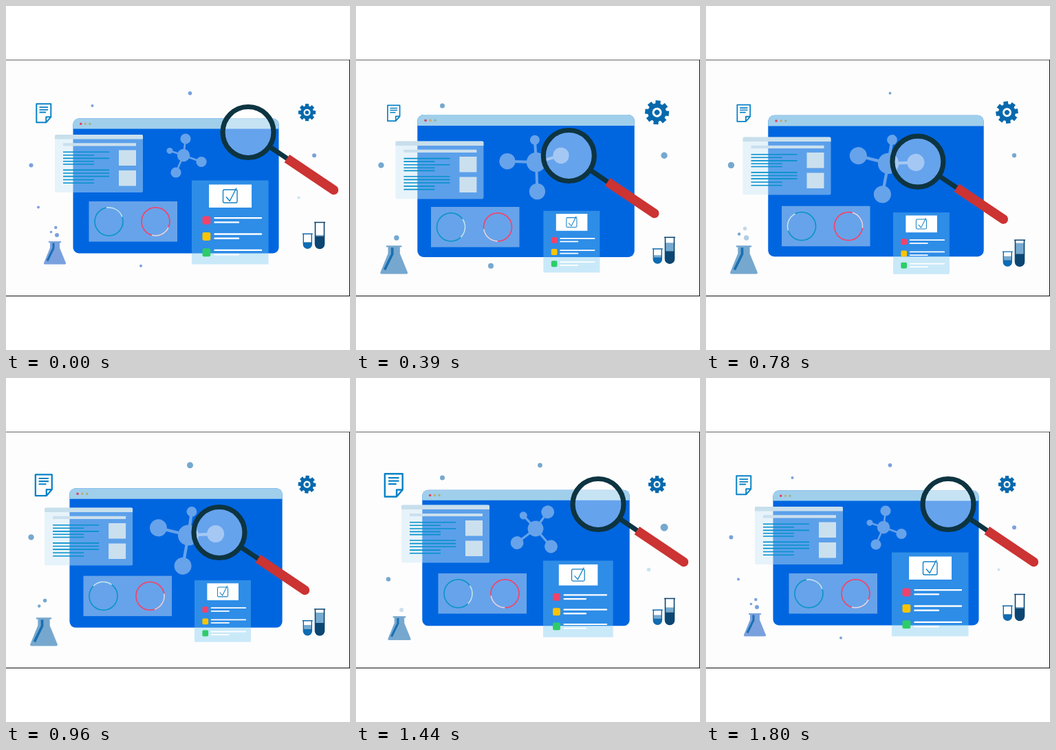
An HTML page that plays this animation: 500x500 px, repeating every 1830 ms.

```html
<!DOCTYPE html>
<html lang="en">
<head>
<meta charset="utf-8">
<title>Research dashboard</title>
<style>
html, body { margin: 0; width: 100%; height: 100%; overflow: hidden; background: #fff; }
svg { display: block; width: 100vw; height: 100vh; }
.line { fill: none; stroke-linejoin: round; }
</style>
</head>
<body>
<svg id="stage" viewBox="0 0 500 500" xmlns="http://www.w3.org/2000/svg">
  <rect y="78" width="500" height="343" fill="#fdfdfd"/>
  <path d="M0 78.5H500" stroke="#666"/>
  <path d="M0 421.5H500M499.5 78V422" stroke="#111"/>

  <g id="dots"></g>

  <g id="doc" class="line" stroke="#0a82c6" stroke-width="2">
    <path d="M3.5 13.5H-10.5V-13.5H10.5V5.5ZV5.5H10.5"/>
    <path d="M-6.3 -8.6H6.3M-6.3 -5H6.3M-6.3 -1.3H3.2" stroke-width="1.8"/>
  </g>

  <g id="gear" fill="#0669ad">
    <g id="teeth"></g>
    <circle r="9.6"/>
    <circle r="5" fill="#fdfdfd"/>
    <circle r="2.7"/>
  </g>

  <g id="flask">
    <path d="M-9 -33.5H9V-31.5H7V-24L16 -2Q16.500 0 14.500 0H-14.500Q-16.500 0 -16 -2L-7 -24V-31.500H-9Z"/>
    <path class="line" d="M-2 -31V-23.500L-11 -5" stroke="#1a70b2" stroke-width="3"/>
    <circle class="bubble" cx="3" cy="-42.500" r="3"/>
    <circle class="bubble" cx="-5.500" cy="-47" r="1.800"/>
    <circle class="bubble" cx="1.300" cy="-53.500" r="2.200"/>
  </g>

  <g id="tubes">
    <g transform="translate(448 313.500)">
      <rect id="tallLevel" x="1.500" width="13" fill="#76aad0"/>
      <path d="M1.500 21H14.500V32.500a6.500 6.500 0 0 1 -13 0Z" fill="#0c4673"/>
      <path class="line" d="M0 1H16M1.500 1V32.500a6.500 6.500 0 0 0 13 0V1" stroke="#0c4673" stroke-width="1.600"/>
    </g>
    <g transform="translate(430.800 330.500)">
      <rect id="shortLevel" x="1.500" width="12" fill="#76aad0"/>
      <path d="M1.500 13H13.500V15.800a6 6 0 0 1 -12 0Z" fill="#0f6cb2"/>
      <path class="line" d="M0 .8H15M1.500 .8V15.800a6 6 0 0 0 12 0V.8" stroke="#1068ab" stroke-width="1.400"/>
    </g>
  </g>

  <g id="win">
    <rect x="-149.500" y="-98" width="299" height="196" rx="8.500" fill="#0066e0"/>
    <path d="M-149.500 -83V-89.500a8.500 8.500 0 0 1 8.500 -8.500H141a8.500 8.500 0 0 1 8.500 8.500V-83Z" fill="#a0cfec"/>
    <circle cx="-138.300" cy="-90.200" r="1.700" fill="#e0405e"/>
    <circle cx="-131.600" cy="-90.200" r="1.700" fill="#c5ab70"/>
    <circle cx="-125" cy="-90.200" r="1.700" fill="#9bb58a"/>
  </g>

  <g id="chart">
    <rect width="128.500" height="58.500" fill="#67a3ea"/>
    <g class="line" stroke-width="1.700">
      <circle cx="29" cy="29.300" r="20.500" stroke="#0c95cb"/>
      <circle cx="97" cy="29.300" r="20.500" stroke="#f2446a"/>
      <circle class="arc" cx="29" cy="29.300" r="20.500"/>
      <circle class="arc" cx="97" cy="29.300" r="20.500"/>
    </g>
  </g>

  <g id="molecule" fill="#67a3ea" stroke="#67a3ea"></g>

  <g id="article">
    <rect width="128" height="84" rx="2" fill="#cde6f5" fill-opacity=".45"/>
    <path d="M0 6.500V2a2 2 0 0 1 2 -2H126a2 2 0 0 1 2 2V6.500Z" fill="#c8dfec"/>
    <path d="M12 12.300H118V16.500H12ZM93 22.500H118V45H93ZM93 52H118V74.500H93Z" fill="#cbe0ee"/>
    <path id="text" stroke="#0591cb" stroke-width="1.600"/>
  </g>

  <g id="list">
    <rect width="111.500" height="122" fill="#76c8f3" fill-opacity=".39"/>
    <rect x="25" y="6" width="62" height="33.500" fill="#fff"/>
    <g class="line" stroke="#1581c4" stroke-width="1.400">
      <rect x="45.500" y="13.500" width="20.500" height="19" rx="2"/>
      <path d="M50 24L55.200 30L65 11"/>
    </g>
    <g id="items"></g>
  </g>

  <g id="lens">
    <circle r="37" fill="#fff" fill-opacity=".4"/>
    <circle class="line" r="37" stroke="#0d3441" stroke-width="7.200"/>
    <g transform="rotate(34)">
      <path d="M38 0H70" stroke="#0d3441" stroke-width="7"/>
      <path d="M68 -6.800H150a6.800 6.800 0 0 1 0 13.600H68Z" fill="#cc3333"/>
    </g>
  </g>
</svg>

<script>
const LOOP = 1830, STEP = 30;
const TIMES = [0, 390, 630, 960, 1230, 1440, 1800];
const $ = id => document.getElementById(id);
const all = cls => [...document.querySelectorAll('.' + cls)];

// Looping monotone cubic through the values at TIMES, at rest where the loop joins.
function track(...values) {
  const v = [...values, values[0]];
  const rate = i => (v[i + 1] - v[i]) / (TIMES[i + 1] - TIMES[i]);
  const slope = v.map((_, i) => {
    if (i === 0 || i === v.length - 1) return 0;
    const a = rate(i - 1), b = rate(i);
    return a * b > 0 ? 2 * a * b / (a + b) : 0;
  });
  return t => {
    if (t >= 1800) return v[0];
    const i = TIMES.findIndex(end => t < end) - 1;
    const h = TIMES[i + 1] - TIMES[i], u = (t - TIMES[i]) / h, w = 1 - u;
    return w * w * ((1 + 2 * u) * v[i] + u * h * slope[i])
      + u * u * ((3 - 2 * u) * v[i + 1] - w * h * slope[i + 1]);
  };
}

const still = n => () => n;

// Each part: x, y, scale, rotation.
const parts = {
  win: [still(247), still(261.5), track(1, 1.055, 1.055, 1.034, 1.018, 1.008)],
  chart: [track(120.5, 109, 109, 112.5, 116.5, 119.5), track(284, 292, 292.4, 287.6, 285, 284)],
  article: [track(71, 57.4, 52.4, 56.1, 60, 66), track(187, 196.4, 192.5, 188.5, 186.5, 184.6)],
  list: [track(270, 272.4, 270.4, 274, 274, 272), track(253.5, 297.7, 302.4, 294, 278.8, 265.5),
    track(1, .735, .735, .735, .817, .912)],
  lens: [track(352, 309.3, 307.3, 310, 349.5, 352), track(183.5, 217.5, 226.5, 224.5, 192.5, 183.5)],
  molecule: [track(258, 262, 265, 265, 263, 261), track(217, 227, 229, 228.5, 223.5, 219),
    track(1, 1.54, 1.655, 1.64, 1.465, 1.24), track(0, 68, 81, 80, 57, 29)],
  doc: [still(54.8), still(155.8), track(1, .84, .77, 1.14, 1.34, 1.23)],
  flask: [track(71, 55.2, 55, 55, 57, 63), track(375.5, 389.5, 389.5, 389.5, 387.5, 381),
    track(1, 1.235, 1.235, 1.235, 1.185, 1.035)],
  tubes: [still(0), track(0, 21.7, 27.5, 21.5, 12.5, 6)]
};
const gearScale = track(1, 1.39, 1.48, 1.025, 1, 1);
parts.gear = [still(437.5), still(154.7), gearScale, t => 130 * (gearScale(t) - 1)];

const tallTop = track(19.5, 9, 5, 6, 8.5, 14);
const shortTop = track(12.5, 10, 8, 7, 7, 8);
const bubbleFade = [
  track(1, 1, 1, 0, 0, .35),
  track(1, 0, 1, 1, 0, 0),
  track(1, 0, 0, 1, 0, 0)
];
const dots = [
  [267.5, 126.8, track(2.8, 0, 0, 4.5, 4, 3.4)],
  [125.5, 145, track(2, 3.5, 0, 0, 0, 3.5)],
  [36.5, 231.4, track(3, 4.2, 4.8, 4.2, 0, 0)],
  [47, 292.4, track(2, 0, 0, 0, 4, 3.2)],
  [196, 377.8, track(2, 4, 0, 0, 0, 0)],
  [448, 217.2, track(3, 4.7, 5.5, 0, 0, 5.5)],
  [425.5, 278.5, track(2, 0, 0, 0, 3.5, 2.8), '#c6e5f1']
];

function build() {
  $('dots').innerHTML = dots.map(([x, y, , fill]) =>
    `<circle cx="${x}" cy="${y}"${fill ? ` fill="${fill}"` : ''}/>`).join('');

  $('teeth').innerHTML = Array.from({ length: 8 }, (_, i) =>
    `<rect x="-2.6" y="-12.5" width="5.2" height="6" transform="rotate(${i * 45})"/>`).join('');

  const nodes = [[3, -24, 7.6], [-20, -6.6, 4.5], [26, 9.5, 7.6], [-11, 25, 7.6]];
  $('molecule').innerHTML = nodes.map(([x, y, r]) =>
    `<path d="M0 0L${x} ${y}" stroke-width="2.6"/><circle cx="${x}" cy="${y}" r="${r}" stroke="none"/>`
  ).join('') + '<circle r="9.2" stroke="none"/>';

  const long = [25.2, 34.4, 51.4, 56, 60.6], short = [29.7, 38.8, 43, 65.5, 70.2];
  $('text').setAttribute('d',
    long.map(y => `M12 ${y}H79`).join('') + short.map(y => `M12 ${y}H57`).join(''));

  $('items').innerHTML = ['#f2426a', '#fcc400', '#2ecc68'].map((fill, i) =>
    `<g transform="translate(0 ${i * 23.4})">
      <rect x="15.5" y="52" width="11.8" height="12" rx="2.4" fill="${fill}"/>
      <path d="M33.5 54.6H101M33.5 60.9H68" stroke="#fff" stroke-width="2.4" stroke-linecap="round"/>
    </g>`).join('');

  for (const arc of all('arc')) {
    arc.setAttribute('stroke', '#cbe1f3');
    arc.setAttribute('stroke-dasharray', '28.6 200');
  }
}

function draw(t) {
  for (const id in parts) {
    const [x, y, scale = still(1), turn = still(0)] = parts[id];
    $(id).setAttribute('transform',
      `translate(${x(t)} ${y(t)}) rotate(${turn(t)}) scale(${scale(t)})`);
  }

  const swing = 1 - Math.abs(1 - t / 915);
  arcs.forEach((arc, i) => {
    const angle = -100 + 125 * i + 360 * swing * swing;
    arc.setAttribute('transform', `rotate(${angle} ${29 + 68 * i} 29.3)`);
  });

  for (const [id, top, base] of [['tallLevel', tallTop, 21], ['shortLevel', shortTop, 13]]) {
    $(id).setAttribute('y', top(t));
    $(id).setAttribute('height', base - top(t));
  }

  bubbles.forEach((b, i) => b.setAttribute('opacity', bubbleFade[i](t)));
  [...$('dots').children].forEach((dot, i) => dot.setAttribute('r', Math.max(0, dots[i][2](t))));

  const tone = t < 200 || t > 1620 ? '#7aa1de' : '#76a8cf';
  $('flask').setAttribute('fill', tone);
  $('dots').setAttribute('fill', tone);
}

build();
const arcs = all('arc'), bubbles = all('bubble');

function tick() {
  const t = performance.now() % LOOP;
  draw(Math.floor(t / STEP) * STEP);
  requestAnimationFrame(tick);
}
tick();
</script>
</body>
</html>
```
